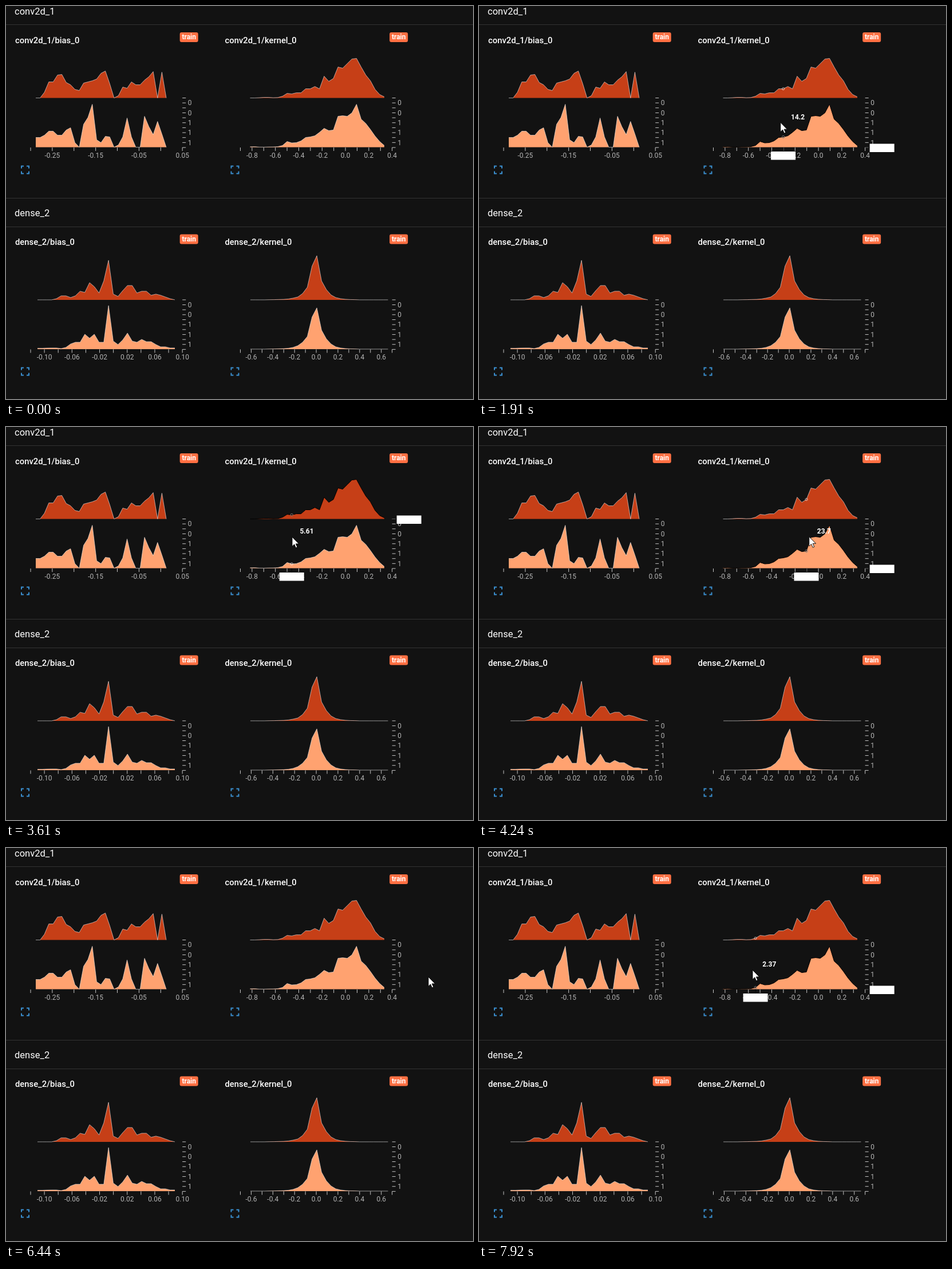
Animation of 816 by 686 pixels, one loop 8 s. Source, as an HTML page:

```html
<!DOCTYPE html>
<html lang="en">
<head>
<meta charset="utf-8">
<title>Histograms</title>
<style>
  html, body { margin: 0; width: 100%; height: 100%; overflow: hidden; background: #121212; }
  svg { display: block; font-family: Roboto, sans-serif; }
  .section { font-size: 16.5px; fill: #fff; }
  .title { font-size: 14.8px; font-weight: 500; fill: #fff; }
  .badge { font-size: 12px; font-weight: 700; fill: #fff; text-anchor: middle; }
  .axis { font-size: 12px; fill: #b4b4b4; }
  .mid { text-anchor: middle; }
  .tick { stroke: #c8c8c8; fill: none; }
  .outline { fill: none; stroke: #fff; stroke-opacity: .55; }
  .outline.hovered { stroke: #000; stroke-opacity: 1; }
  .dot { fill: none; stroke: #fff; stroke-opacity: .6; }
  .dot.hovered { stroke: #777; stroke-opacity: 1; }
  .value { font-size: 12px; font-weight: 700; fill: #fff; }
</style>
</head>
<body>
<svg id="stage" width="816" height="686" viewBox="0 0 816 686"></svg>
<script>
const stage = document.getElementById('stage');
const COLORS = ['#c63f17', '#ffa270'];
const BASES = [160.5, 246.5];

function add(parent, tag, attrs, text) {
  const node = document.createElementNS('http://www.w3.org/2000/svg', tag);
  for (const key in attrs) node.setAttribute(key, attrs[key]);
  if (text !== undefined) node.textContent = text;
  return parent.appendChild(node);
}

const zeros = n => Array(n).fill(0);
const tailIn = [...zeros(4), .2, .3, .6, .8, 1.5, 3];
const tailOut = [4, 2, 1, .5, .3, ...zeros(7)];

// Bin heights are in pixels above each series' baseline.
const charts = [
  { name: 'conv2d_1/bias_0', left: 0, row: 0, from: 52, to: 280, intervals: 7, first: -.25, step: .1, digits: 2, series: [
    [0, 0, 10, 28, 28, 40, 41, 27, 23, 15, 13, 26, 28, 30, 33, 43, 47, 25, 0, 4, 19, 17, 28, 23, 23, 31, 37, 46, 0, 45, 0],
    [17, 17, 21, 28, 28, 21, 21, 30, 34, 8, 0, 40, 52, 75, 13, 8, 19, 18, 0, 4, 18, 51, 18, 0, 0, 54, 36, 22, 45, 23, 0]] },
  { name: 'conv2d_1/kernel_0', left: 366.5, row: 0, from: 426.5, to: 661, intervals: 13, first: -.8, step: .2, digits: 1, series: [
    [0, 0, .4, 1, 1, .4, .7, 3, 8, 7.1, 9, 9, 16, 16, 20, 16, 38, 29, 34, 54, 52, 60, 68, 69, 54, 40, 30, 15, 6, 2],
    [.8, .9, .3, .2, .5, .6, 1, 3, 10, 7.5, 8, 11, 17, 18, 20, 26, 33, 29, 30, 54, 55, 54, 60, 75, 49, 41.52, 31, 19.5, 10, 3]] },
  { name: 'dense_2/bias_0', left: 0, row: 1, from: 55, to: 295, intervals: 11, first: -.1, step: .04, digits: 2, series: [
    [0, 0, 0, 0, 2, 7, 7, 4, 7, 15, 13, 30, 23, 12, 33, 69, 10, 6, 16, 25, 25, 12, 15, 15, 8, 10, 8, 5, 2, 0],
    [1.5, 1.5, 1.8, 2, 2, 1, 3, 9, 12, 12, 26, 19, 26, 12, 12, 76, 14, 8, 16, 28, 14, 12, 17, 13, 13, 8, 4, 4, 2, 2]] },
  { name: 'dense_2/kernel_0', left: 366.5, row: 1, from: 427, to: 667.5, intervals: 14, first: -.6, step: .2, digits: 1, series: [
    [...tailIn, 5, 11, 22, 59, 77, 33, 18, 8.5, ...tailOut],
    [...tailIn, 6, 12, 22, 56, 72, 33, 18, 9, ...tailOut]] }
];

const binX = (chart, i) => chart.from + i * (chart.to - chart.from) / (chart.series[0].length - 1);

function drawAxes(group, chart) {
  const start = 43 + chart.left, end = 308.2 + chart.left;
  let ticks = '';
  for (let i = 0; i <= chart.intervals; i++) {
    const x = start + i * (end - start) / chart.intervals;
    ticks += `M${x} 247v6`;
    if (i % 2) {
      const value = chart.first + (i - 1) / 2 * chart.step;
      const label = Math.abs(value) < 1e-9 ? (0).toFixed(chart.digits) : value.toFixed(chart.digits);
      add(group, 'text', { x, y: 264.5, class: 'axis mid' }, label);
    }
  }
  for (let i = 0; i <= 10; i++) {
    const y = 160.5 + i * 8.65;
    ticks += `M${end} ${y}h6`;
    if (i % 2) add(group, 'text', { x: end + 9.5, y: y + 4.3, class: 'axis' }, i < 5 ? 0 : 1);
  }
  add(group, 'path', { d: ticks, class: 'tick' });
}

function drawChart(chart) {
  const top = chart.row * 352, x = chart.left;
  const frame = add(stage, 'g', { transform: `translate(0 ${top})` });
  add(frame, 'text', { x: x + 16, y: 64.5, class: 'title' }, chart.name);
  add(frame, 'rect', { x: x + 303.7, y: 46 + chart.row * .5, width: 32, height: 17, rx: 3, fill: '#ff7043' });
  add(frame, 'text', { x: x + 319.7, y: 58.3 + chart.row * .5, class: 'badge' }, 'train');
  add(frame, 'path', {
    d: `M${x + 27} 283.5v-4h4m5 0h4v4m0 5v4h-4m-5 0h-4v-4`,
    fill: 'none', stroke: '#3a8fd0', 'stroke-width': 2
  });

  const plot = add(stage, 'g', { transform: `translate(0 ${chart.row * 352.4})` });
  drawAxes(plot, chart);
  chart.outlines = chart.series.map((heights, s) => {
    const line = heights.map((h, i) => `${binX(chart, i).toFixed(2)} ${(BASES[s] - h).toFixed(2)}`).join('L');
    add(plot, 'path', { d: `M${chart.from} ${BASES[s]}L${line}L${chart.to} ${BASES[s]}Z`, fill: COLORS[s] });
    return add(plot, 'path', { d: 'M' + line, class: 'outline' });
  });
}

for (const y of [32.5, 335.5, 385.5]) add(stage, 'path', { d: `M0 ${y}H816`, stroke: '#333' });
add(stage, 'text', { x: 15, y: 14.5, class: 'section' }, 'conv2d_1');
add(stage, 'text', { x: 15, y: 366.5, class: 'section' }, 'dense_2');
charts.forEach(drawChart);

const active = charts[1];
const hover = add(stage, 'g', {});
const dots = BASES.map(() => add(hover, 'circle', { r: 2.1, class: 'dot' }));
const axisMarks = add(hover, 'path', { stroke: '#000' });
const xBox = add(hover, 'rect', { y: 254, width: 43, height: 14.5, fill: '#fff' });
const yBox = add(hover, 'rect', { x: 682.7, width: 43, height: 14.5, fill: '#fff' });
const valueLabel = add(hover, 'text', { class: 'value' });
const cursor = add(stage, 'path', {
  d: 'M0 0V16.5L3.8 12.8L6.4 18.8L9 17.7L6.4 11.9H11.7Z', fill: '#fff', stroke: '#000', 'stroke-width': .9
});

const LOOP = 8000, START = 750, STEP = 77.9, SLACK = 24;
const UNITS_PER_PX = .79;

// Pointer paths as [step, x, y]; the pointer is off stage between them.
const paths = [
  [[0, 806, 296], [3, 722, 252], [7, 632, 216], [9, 618, 213], [10, 595, 211], [21, 445, 194], [23, 430, 192],
   [28, 430, 192], [33, 458, 192], [37, 500, 192], [39, 531, 192], [50, 615, 191], [51, 622, 192],
   [55, 648, 197], [57, 665, 198], [58, 665, 198], [63, 712, 201]],
  [[70, 806, 235], [73, 738, 225], [78, 622, 217], [79, 583, 216], [80, 577, 215], [92, 478, 213], [93, 470, 213]]
];

function pointAt(path, step) {
  const next = Math.max(1, path.findIndex(p => p[0] >= step));
  const [a, b] = [path[next - 1], path[next]];
  const f = Math.max(0, (step - a[0]) / (b[0] - a[0]));
  return { x: a[1] + (b[1] - a[1]) * f, y: a[2] + (b[2] - a[2]) * f };
}

const show = (node, on) => node.setAttribute('visibility', on ? 'visible' : 'hidden');

function set(node, attrs) {
  for (const key in attrs) node.setAttribute(key, attrs[key]);
}

function render(time) {
  const step = Math.floor((time - START + SLACK) / STEP);
  const path = time < START ? null : paths.find(p => step >= p[0][0] && step <= p[p.length - 1][0]);
  show(cursor, path);
  let hovered = -1;
  if (path) {
    const tip = pointAt(path, step);
    cursor.setAttribute('transform', `translate(${tip.x} ${tip.y})`);
    // The chart reacts slightly behind the pointer.
    const mouse = pointAt(path, step - .2);
    if (mouse.x < 677) hovered = updateHover(mouse);
  }
  show(hover, hovered >= 0);
  active.outlines.forEach((line, s) => line.classList.toggle('hovered', s === hovered));
}

function updateHover({ x, y }) {
  const count = active.series[0].length;
  const spacing = (active.to - active.from) / (count - 1);
  const bin = Math.max(0, Math.min(count - 1, Math.round((x - active.from) / spacing)));
  const cx = binX(active, bin);
  const ys = active.series.map((heights, s) => BASES[s] - heights[bin]);
  const nearest = Math.abs(ys[0] - y) < Math.abs(ys[1] - y) ? 0 : 1;
  dots.forEach((dot, s) => {
    set(dot, { cx, cy: ys[s] });
    dot.classList.toggle('hovered', s === nearest);
  });
  set(axisMarks, { d: `M${cx} 247v7M675 ${BASES[nearest] + .5}h8` });
  set(xBox, { x: cx - 21.5 });
  set(yBox, { y: BASES[nearest] - 6 });
  set(valueLabel, { x: x + 15.5, y: y - 5.7 });
  valueLabel.textContent = (active.series[nearest][bin] * UNITS_PER_PX).toPrecision(3);
  return nearest;
}

const began = performance.now();
function tick() {
  render((performance.now() - began) % LOOP);
  requestAnimationFrame(tick);
}
tick();
</script>
</body>
</html>
```
